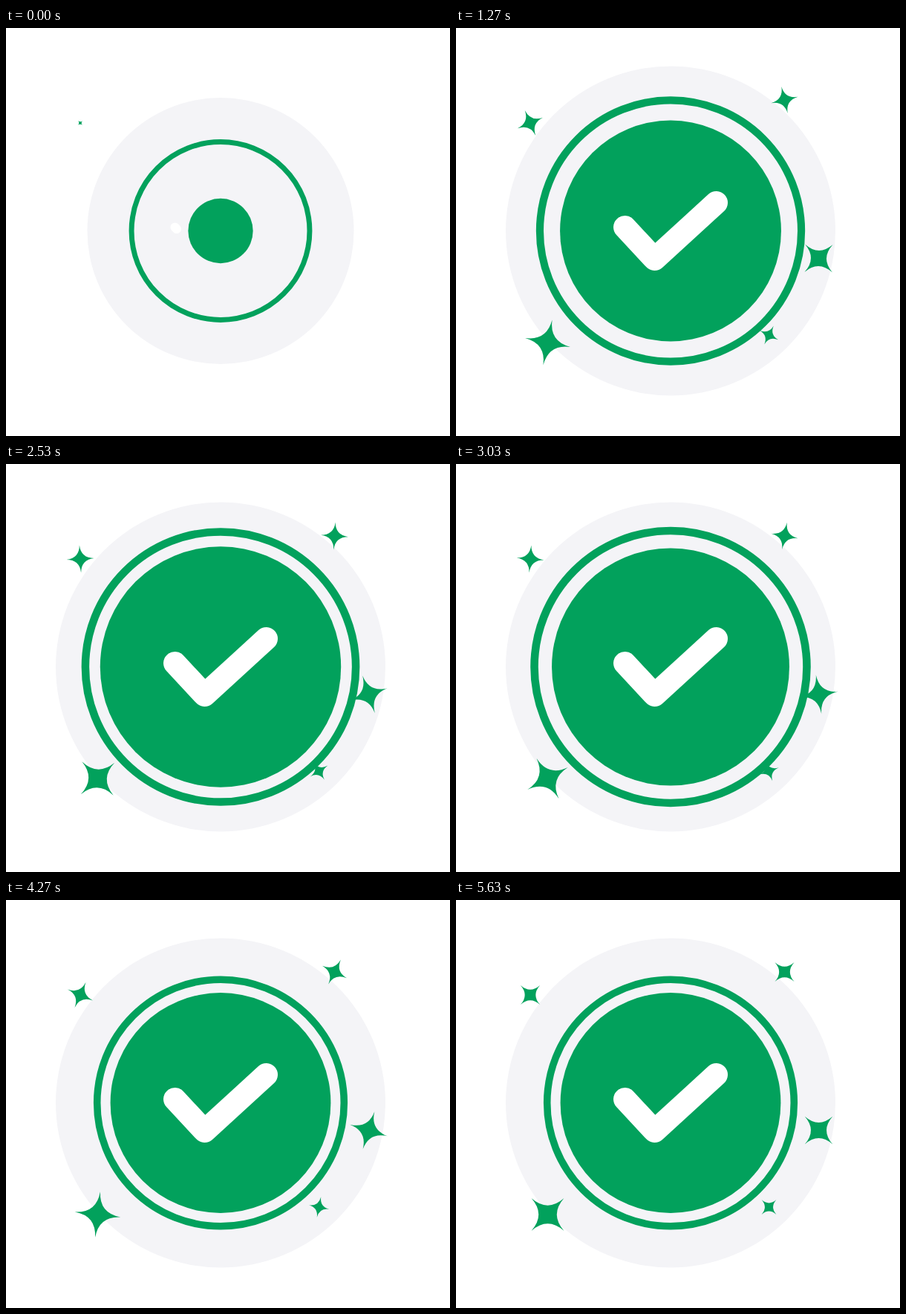
An HTML page that plays this animation: 598x550 px, repeating every 6.91 s.

```html
<!DOCTYPE html>
<html lang="en">
<head>
<meta charset="utf-8">
<title>Success check</title>
<style>
  html, body { margin: 0; width: 100%; height: 100%; overflow: hidden; background: #fff; }
  svg { display: block; width: 598px; height: 550px; }
  #halo { fill: #f4f4f7; }
  #ring { fill: none; stroke: #02a15c; stroke-width: 9.6; }
  #disc, #stars { fill: #02a15c; }
  #tick {
    fill: none; stroke: #fff; stroke-linecap: round; stroke-linejoin: round;
    stroke-dasharray: 1 2;
  }
</style>
</head>
<body>
<svg viewBox="0 0 598 550">
  <defs>
    <path id="spark" d="M0-1Q.06-.06 1 0Q.06.06 0 1Q-.06.06-1 0Q-.06-.06 0-1Z"/>
  </defs>
  <g transform="translate(289 273.5)">
    <circle id="halo" r="222"/>
    <circle id="ring" r="166.3"/>
    <circle id="disc" r="148.4"/>
  </g>
  <g id="stars"></g>
  <path id="tick" pathLength="1" d="M227.5 268.5L267.5 311.5L350.5 235.5"/>
</svg>
<script>
  const LOOP = 6910, SPIN_END = 5630, POP = 400;
  const BEAT = 472, BEATS = 7, SWELL = .105, OVERSHOOT = .2;

  const $ = id => document.getElementById(id);
  const clamp = x => Math.min(1, Math.max(0, x));
  const ease = x => (1 - Math.cos(Math.PI * clamp(x))) / 2;

  // Grow past full size until the peak, then settle back
  const enter = (t, { peak, rise, fall }) =>
    (1 + OVERSHOOT) * ease(1 + (t - peak) / rise) - OVERSHOOT * ease((t - peak) / fall);

  // A fixed number of swells, at rest before and after
  const pulse = (t, start) => {
    const beats = Math.min(BEATS, Math.max(0, (t - start) / BEAT));
    return 1 + SWELL * (1 - Math.cos(2 * Math.PI * beats)) / 2;
  };

  // The ring's beat trails the disc's
  const circles = [
    { id: "halo", peak: 155, rise: 398, fall: 398 },
    { id: "ring", peak: 216, rise: 494, fall: 494, beat: 926 },
    { id: "disc", peak: 430, rise: 640, fall: 395, beat: 827 }
  ];

  // Each star pops in, then turns steadily until it rests as an X
  const stars = [
    { x: 100, y: 128, r: 18.5, turn: 88, delay: -90 },
    { x: 442.5, y: 97, r: 18.5, turn: 75, delay: 340 },
    { x: 488.5, y: 310.5, r: 26.5, turn: 115, delay: 0 },
    { x: 123.5, y: 424, r: 31, turn: 160, delay: 440 },
    { x: 421.5, y: 414, r: 14, turn: 140, delay: 30 }
  ];
  for (const star of stars) {
    star.el = document.createElementNS("http://www.w3.org/2000/svg", "use");
    star.el.setAttribute("href", "#spark");
    $("stars").append(star.el);
  }

  function draw(t) {
    for (const c of circles) {
      const scale = enter(t, c) * (c.beat ? pulse(t, c.beat) : 1);
      $(c.id).setAttribute("transform", `scale(${scale})`);
    }
    for (const { el, x, y, r, turn, delay } of stars) {
      const angle = 45 - turn * (1 - clamp(t / SPIN_END));
      const size = r * clamp((t - delay) / POP);
      el.setAttribute("transform", `translate(${x} ${y}) rotate(${angle}) scale(${size})`);
    }
    $("tick").style.strokeDashoffset = .98 * (1 - ease(t / 430));
    $("tick").style.strokeWidth = 12 + 19 * clamp(t / 120);
  }

  const begin = performance.now();
  function frame() {
    draw((performance.now() - begin) % LOOP);
    requestAnimationFrame(frame);
  }
  draw(0);
  requestAnimationFrame(frame);
</script>
</body>
</html>
```
